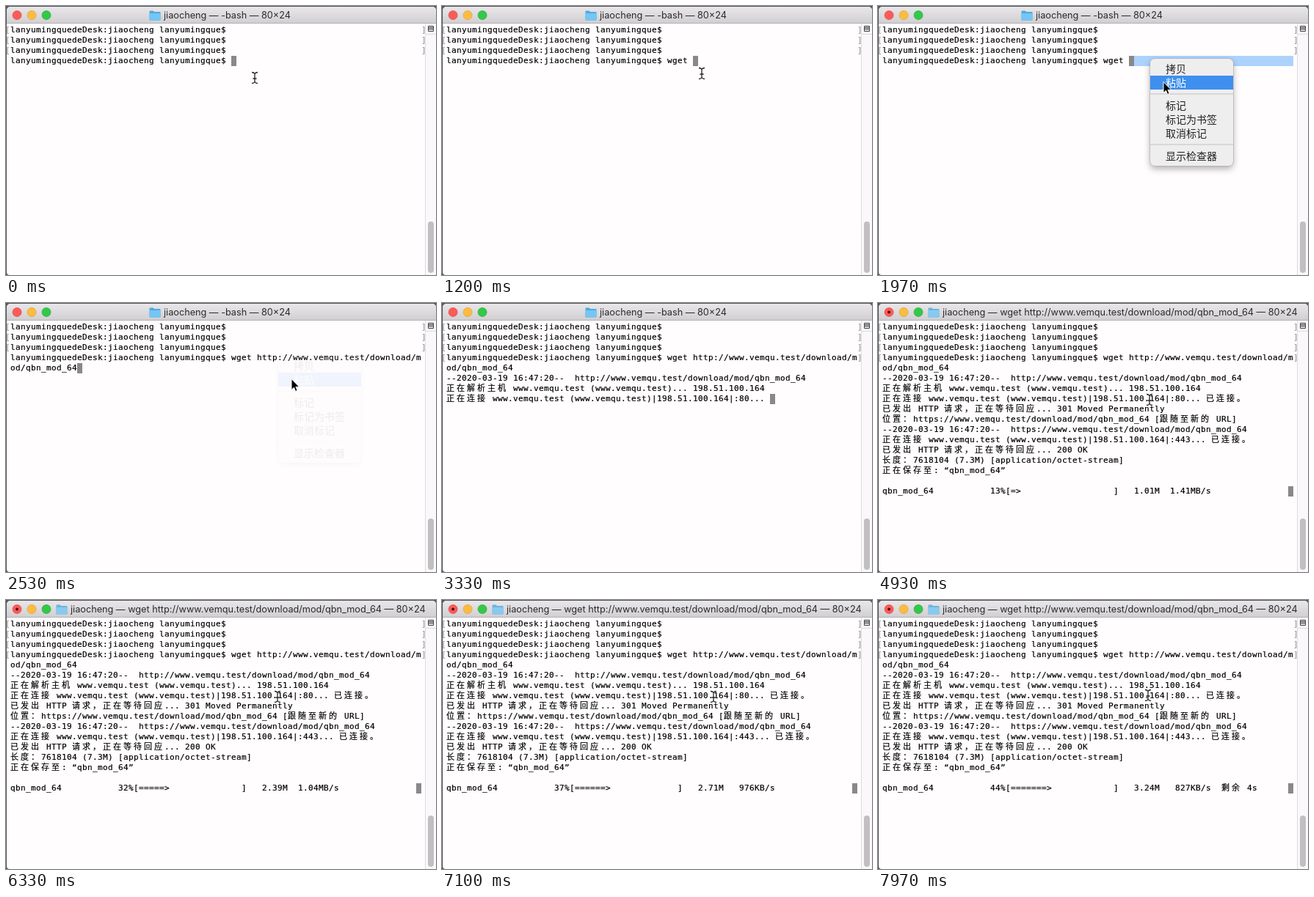
Recreate the animation shown at these times as an HTML page. Size 586x367 px, loop 8000 ms.

```html
<!DOCTYPE html>
<html lang="zh-CN">
<head>
<meta charset="utf-8">
<title>Terminal</title>
<style>
html, body { margin: 0; width: 100%; height: 100%; overflow: hidden; background: #55575e; }
#stage { position: relative; width: 586px; height: 367px; overflow: hidden; }
#stage * { box-sizing: border-box; }
#window { position: absolute; inset: 1px 0 0 1px; background: #fffdfe; border-radius: 5px 5px 4px 4px; overflow: hidden; }
#bar { height: 23px; background: linear-gradient(#e9e7e9, #d1cfd1); border-bottom: 1px solid #b3b1b3; }
svg { position: absolute; left: 0; top: 0; overflow: visible; }

.title { position: absolute; top: 1px; left: 215px; white-space: pre; color: #2c2b2c;
  font: 12.7px/23px Inter, sans-serif; animation: idle 8s step-end infinite; }
.title.busy { left: 88px; animation-name: busy; }
.title svg { left: -20px; top: 4px; }
#dot { animation: busy 8s step-end infinite; }
@keyframes idle { 0% { opacity: 1 } 43.75%, 100% { opacity: 0 } }
@keyframes busy { 0% { opacity: 0 } 43.75%, 100% { opacity: 1 } }

#screen { position: absolute; left: 6px; top: 26px; color: #000; -webkit-text-stroke: .2px;
  font: 11px/14px "DejaVu Sans Mono", monospace; }
.row { position: relative; height: 14px; white-space: pre; letter-spacing: calc(7px - 1ch); }
.row i { font: 11px/0 "Noto Sans CJK SC", "Noto Sans CJK JP", "Noto Sans CJK", sans-serif; letter-spacing: calc(14px - 1em); }
.marked::before, .marked::after { content: "["; position: absolute; left: -7px; color: #9c9a9c; }
.marked::after { content: "]"; left: 560px; }
#block, #picked { position: absolute; height: 14px; }
#block { width: 7px; background: #8a888a; }
#picked { left: 349px; top: 68px; width: 217px; background: #add3fd; animation: picked 8s step-end infinite; }
@keyframes picked { 0% { opacity: 0 } 18.75% { opacity: 1 } 31.25%, 100% { opacity: 0 } }

#menu { position: absolute; left: 371px; top: 72px; width: 113px; height: 146px; padding-top: 4px; border-radius: 6px;
  background: #efeeef; box-shadow: 0 0 0 .5px #aaa, 0 4px 10px rgba(0, 0, 0, .32);
  font: 14px/19px "Noto Sans CJK SC", "Noto Sans CJK JP", "Noto Sans CJK", sans-serif; color: #222;
  animation: menu 8s infinite; }
#menu div { height: 19px; padding-left: 21px; white-space: nowrap; }
#menu hr { height: 2px; margin: 5px 0; border: 0; background: #d9d8d9; }
#menu .hot { animation: hot 8s step-end infinite; }
@keyframes menu {
  0% { opacity: 0; animation-timing-function: step-end }
  18.75%, 30% { opacity: 1 }
  32.5%, 100% { opacity: 0 }
}
@keyframes hot {
  0%, 28.75% { background: none; color: #222 }
  22.5%, 29.5% { background: #3e8fee; color: #fff }
  33%, 100% { background: none; color: #222 }
}

#pointer { animation: travel 8s ease-in-out infinite; }
#beam { animation: beam 8s step-end infinite; }
#arrow { animation: arrow 8s step-end infinite; }
@keyframes travel {
  0%, 11.9% { transform: translate(339px, 98px) }
  14.75%, 15.25% { transform: translate(354px, 92px) }
  17.75%, 19.25% { transform: translate(370px, 71px) }
  23.75%, 53.75% { transform: translate(389px, 104px) }
  57%, 95% { transform: translate(370px, 132px) }
  97%, 100% { transform: translate(368px, 130px) }
}
@keyframes beam {
  0%, 11.25%, 32.5%, 53.75% { opacity: 1 }
  4.1%, 18.75%, 36.9% { opacity: 0 }
  100% { opacity: 1 }
}
@keyframes arrow { 0% { opacity: 0 } 18.75% { opacity: 1 } 32.5%, 100% { opacity: 0 } }
</style>
</head>
<body>
<div id="stage">
  <div id="window"><div id="bar"></div></div>

  <svg width="586" height="367">
    <defs>
      <g id="folder">
        <path d="M.5 2.5q0-1 1-1h4l1.5 1.5h7.5q1 0 1 1v9.5q0 1-1 1h-13q-1 0-1-1z" fill="#4fa9de"/>
        <path d="M.5 5h15v8.5q0 1-1 1h-13q-1 0-1-1z" fill="#74c6f4"/>
      </g>
      <path id="beamShape" d="M-4-7.5q3 0 4 2q1-2 4-2M0-5.5V5.5M-4 7.5q3 0 4-2q1 2 4 2M-2.5 1h5"/>
    </defs>
    <g stroke-width=".7">
      <circle cx="15" cy="12.5" r="6" fill="#fc5b57" stroke="#df4744"/>
      <circle cx="35" cy="12.5" r="6" fill="#fdbc40" stroke="#de9f34"/>
      <circle cx="55" cy="12.5" r="6" fill="#34c84a" stroke="#27aa35"/>
    </g>
    <circle id="dot" cx="15" cy="12.5" r="2" fill="#5a0806"/>
    <path d="M571 24h15v343h-15z" fill="#faf8fa"/>
    <path d="M571.5 24v343M571 38.5h15" stroke="#dddbdd"/>
    <rect x="575" y="294" width="8" height="70" rx="4" fill="#c1bfc1"/>
    <path d="M575.5 27.5h7v7h-7zM576 29.5h6M576 31.5h6" fill="#ddd" stroke="#444"/>
  </svg>

  <div class="title"><svg width="16" height="16"><use href="#folder"/></svg>jiaocheng — -bash — 80×24</div>
  <div class="title busy"><svg width="16" height="16" opacity=".8"><use href="#folder"/></svg>jiaocheng — wget http://www.vemqu.test/download/mod/qbn_mod_64 — 80×24</div>

  <div id="picked"></div>
  <div id="block"></div>
  <div id="screen"></div>

  <div id="menu">
    <div>拷贝</div><div class="hot">粘贴</div><hr>
    <div>标记</div><div>标记为书签</div><div>取消标记</div><hr>
    <div>显示检查器</div>
  </div>

  <svg width="586" height="367">
    <g id="pointer">
      <g id="beam" fill="none">
        <use href="#beamShape" stroke="#fff" stroke-width="2.6" opacity=".8"/>
        <use href="#beamShape" stroke="#222" stroke-width="1.3"/>
      </g>
      <path id="arrow" d="M0-.5v15l3.4-3.2 2.2 5.2 2.5-1.1-2.2-5h4.8z" fill="#000" stroke="#fff"/>
    </g>
  </svg>
</div>

<script>
const LOOP = 8000, CELL = 7, ROW = 14;
const ENTER = 2950, DOWNLOAD = 4110, TICK = 200, TOTAL = 7618104 / 2 ** 20;
const prompt = 'lanyumingquedeDesk:jiaocheng lanyumingque$ ';
const host = 'www.vemqu.test', ip = '198.51.100.164', file = 'qbn_mod_64';
const path = `://${host}/download/mod/${file}`;
const stamp = '--2020-03-19 16:47:20--  ';
const connect = `正在连接 ${host} (${host})|${ip}|`;
const request = '已发出 HTTP 请求，正在等待回应... ';

// Terminal output: [time, text]
const stream = [
  [0, (prompt + '\n').repeat(3) + prompt],
  ...[...'wget '].map((key, i) => [300 + i * 130, key]),
  [2500, `http://${host}/download/m\nod/${file}`],
  [ENTER, `\n${stamp}http${path}\n正在解析主机 ${host} (${host})... `],
  [3150, `${ip}\n${connect}:80... `],
  [3600, `已连接。\n${request}`],
  [3720, `301 Moved Permanently\n位置：https${path} [跟随至新的 URL]\n${stamp}https${path}\n${connect}:443... `],
  [3860, `已连接。\n${request}`],
  [4040, `200 OK\n长度：7618104 (7.3M) [application/octet-stream]\n正在保存至: “${file}”\n\n`],
];

// Download progress: [time, megabytes, megabytes per second]
const pace = [[4110, 0, 1.8], [4910, 1.01, 1.41], [6310, 2.39, 1.04], [7910, 3.24, 827 / 1024]];

const han = /[\u3000-\u9fff\uff00-\uffef]+/g;
const cells = text => text.length + (text.match(han) || []).join('').length;
const human = mb => mb >= 1 ? mb.toFixed(2) + 'M' : Math.round(mb * 1024) + 'K';

function progress(t) {
  const at = DOWNLOAD + TICK * Math.floor((t - DOWNLOAD) / TICK);
  const k = Math.max(1, pace.findIndex(p => at <= p[0]));
  const [a, b] = [pace[k - 1], pace[k]];
  const mix = i => a[i] + (b[i] - a[i]) * (at - a[0]) / (b[0] - a[0]);
  const size = mix(1), part = size / TOTAL, bars = Math.floor(20 * part);
  const bar = (bars ? '='.repeat(bars - 1) + '>' : '').padEnd(20);
  const speed = size ? human(mix(2)) + 'B/s' : '--.-KB/s';
  return file.padEnd(20) + `${Math.floor(100 * part)}`.padStart(3) + `%[${bar}]`
    + (size ? human(size) : '0').padStart(8) + speed.padStart(10) + (t >= 7110 ? '  剩余 4s' : '');
}

const screen = document.getElementById('screen');
const block = document.getElementById('block');
let shown = '';

function render(t) {
  const loading = t >= DOWNLOAD;
  const text = stream.filter(s => t >= s[0]).map(s => s[1]).join('') + (loading ? progress(t) : '');
  if (text === shown) return;
  shown = text;
  const rows = text.split('\n');
  const marks = t >= ENTER ? 4 : 3;
  screen.innerHTML = rows.map((row, i) =>
    `<div class="row${i < marks ? ' marked' : ''}">${row.replace(/>/g, '&gt;').replace(han, '<i>$&</i>')}</div>`).join('');
  const column = loading ? 79 : cells(rows[rows.length - 1]);
  block.style.left = 6 + column * CELL + 'px';
  block.style.top = 26 + (rows.length - 1) * ROW + 'px';
}

const start = performance.now();
function frame() {
  render((performance.now() - start) % LOOP);
  requestAnimationFrame(frame);
}
frame();
</script>
</body>
</html>
```
